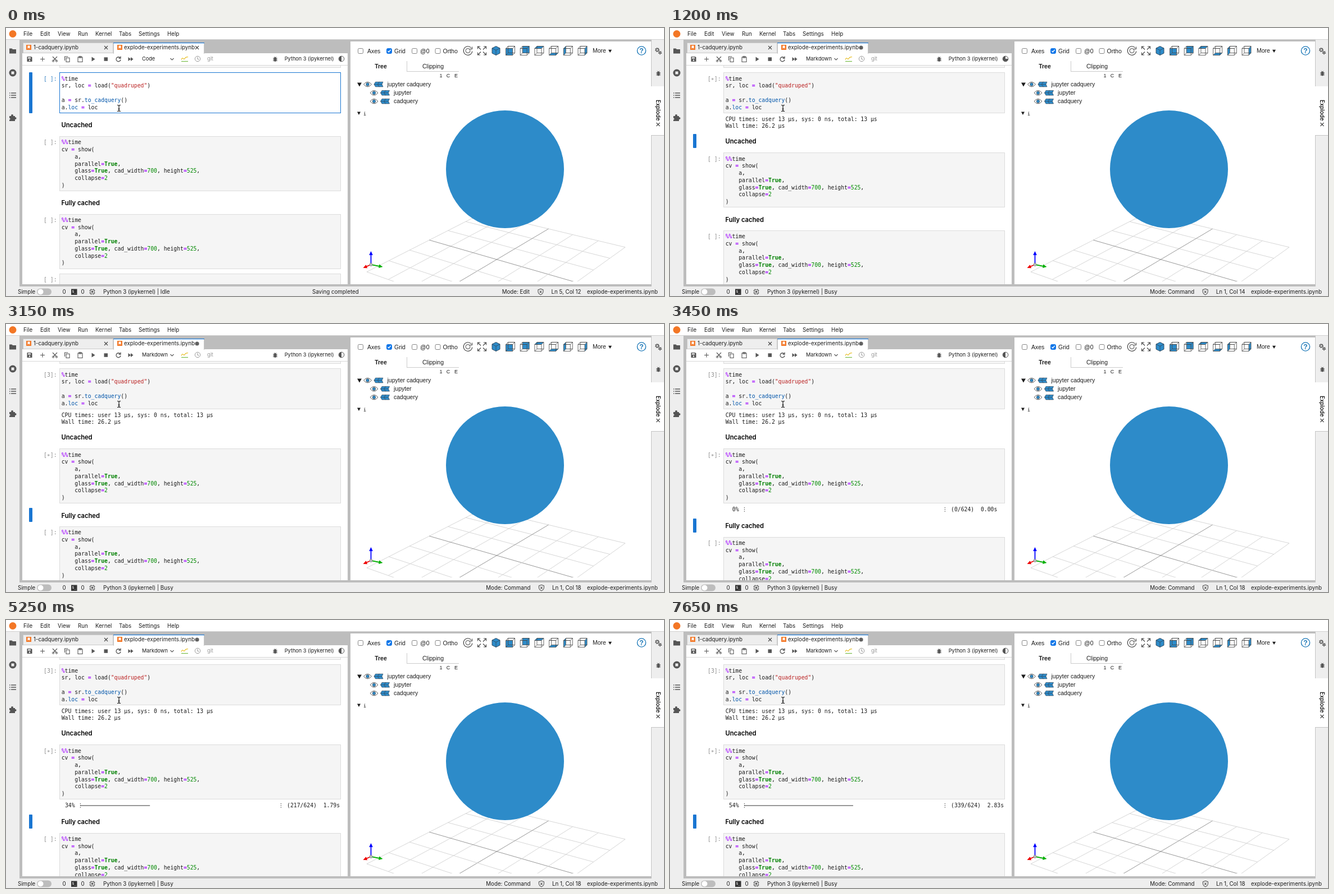
An HTML page with a canvas that plays this animation: 1171x478 px, repeating every 8 s.

```html
<!DOCTYPE html>
<html lang="en">
<head>
<meta charset="utf-8">
<title>Notebook run</title>
<style>
  html, body { margin: 0; width: 100%; height: 100%; overflow: hidden; background: #fff; }
  canvas { display: block; }
</style>
</head>
<body>
<canvas id="stage" width="1171" height="478"></canvas>
<script>
const ctx = document.getElementById('stage').getContext('2d');
const LOOP = 8000;
const UI = 'Inter, sans-serif', SANS = '"Liberation Sans", Arial, sans-serif';
const MONO = '"DejaVu Sans Mono", monospace';
const BLUE = '#1976d2', CAD = '#2d8bc9', ICON = '#555', INK = '#1c1c1c', ORANGE = '#f37726';
const GAP = '#bdbdbd';
const LINE = 12.75;

const LOAD = ['%time', 'sr, loc = load("quadruped")', '', 'a = sr.to_cadquery()', 'a.loc = loc'];
const SHOW = ['%%time', 'cv = show(', '    a,', '    parallel=True,',
  '    glass=True, cad_width=700, height=525,', '    collapse=2', ')'];

// time in ms, parts done, seconds shown
const PROGRESS = [[3450, 0, 0], [3900, 21, .41], [4200, 54, .69], [4350, 76, .89], [4500, 108, 1.05],
  [4800, 152, 1.32], [4950, 188, 1.51], [5250, 217, 1.79], [5550, 236, 2.06], [5700, 258, 2.23],
  [5850, 276, 2.39], [6150, 304, 2.63], [6300, 339, 2.83]];

function rect(x, y, w, h, fill) {
  ctx.fillStyle = fill;
  ctx.fillRect(x, y, w, h);
}

function frame(x, y, w, h, fill, stroke) {
  rect(x, y, w, h, fill);
  ctx.strokeStyle = stroke;
  ctx.lineWidth = 1;
  ctx.strokeRect(x, y, w, h);
}

function disc(x, y, r, fill, stroke, width = 1) {
  ctx.beginPath();
  ctx.arc(x, y, r, 0, 7);
  if (fill) { ctx.fillStyle = fill; ctx.fill(); }
  if (stroke) { ctx.strokeStyle = stroke; ctx.lineWidth = width; ctx.stroke(); }
}

// y is the optical middle of the line
function text(str, x, y, { size = 9.75, font = UI, color = INK, weight = 400, align = 'left' } = {}) {
  ctx.font = `${weight} ${size}px ${font}`;
  ctx.fillStyle = color;
  ctx.textAlign = align;
  ctx.fillText(str, x, y + size * .355);
  return ctx.measureText(str).width;
}

const mono = (str, x, y, opts) => text(str, x, y, { font: MONO, ...opts });
const sans = (str, x, y, opts) => text(str, x, y, { font: SANS, size: 10.5, ...opts });

function icon(x, y, d, stroke = ICON, fill = null, width = 1.1) {
  const path = new Path2D(d);
  ctx.save();
  ctx.translate(x, y);
  if (fill) { ctx.fillStyle = fill; ctx.fill(path); }
  if (stroke) { ctx.strokeStyle = stroke; ctx.lineWidth = width; ctx.stroke(path); }
  ctx.restore();
}

const cross = (x, y) => icon(x, y, 'M-3 -3L3 3M3 -3L-3 3', '#444');

function bug(x, y) {
  icon(x, y, 'M-4 -1.5H4M-4 .7H4M-4 3H4M-2 -4.5L0 -2.5L2 -4.5', ICON, null, .8);
  icon(x, y, 'M-2.4 -1A2.4 2.6 0 0 1 2.4 -1V2A2.4 2.4 0 0 1 -2.4 2Z', null, ICON);
}

function gear(x, y, r) {
  ctx.setLineDash([1.5, 1.2]);
  disc(x, y, r, null, ICON, 1.6);
  ctx.setLineDash([]);
  disc(x, y, r - 1, null, ICON, 1.2);
}

function codeLine(line, x, y) {
  for (const part of line.split(/("[^"]*"|\bTrue\b|\b\d+\b|[%=]+|(?<=\.)\w+)/)) {
    const style = /^"/.test(part) ? { color: '#ba2121' }
      : part === 'True' ? { color: '#008000', weight: 700 }
      : /^\d/.test(part) ? { color: '#080' }
      : /^[%=]/.test(part) ? { color: '#a2f', weight: 700 }
      : /^(to_cadquery|loc)$/.test(part) ? { color: '#05a' } : {};
    x += mono(part, x, y, style);
  }
}

function codeCell(top, lines, prompt, { active, editing } = {}) {
  const height = lines.length * LINE + 9;
  frame(95.5, Math.round(top) + .5, 500, Math.round(height) - 1,
    editing ? '#fff' : '#f5f5f5', editing ? BLUE : '#dcdcdc');
  mono(prompt, 90.5, top + 10.9, { align: 'right', color: active ? '#307fc1' : '#8b8b8b' });
  lines.forEach((line, i) => codeLine(line, 98.7, top + 10.9 + i * LINE));
  if (active) marker(top, height);
}

function marker(top, height) {
  ctx.fillStyle = BLUE;
  ctx.beginPath();
  ctx.roundRect(41, Math.floor(top), 6, Math.round(height), 1);
  ctx.fill();
}

function heading(str, y, active) {
  text(str, 98.5, y, { size: 11.2, weight: 600, color: '#000' });
  if (active) marker(y - 13, 25);
}

function progressBar(t, y) {
  const [, done, seconds] = PROGRESS.filter(p => p[0] <= t).pop();
  mono(Math.floor(done / 6.24) + '%', 122.5, y, { align: 'right' });
  mono('⋮', 127.5, y);
  rect(132, y - .5, 357 * done / 624, 1, '#333');
  mono(`⋮ (${done}/624)  ${seconds.toFixed(2)}s`, 484.5, y);
}

function notebook(t) {
  const ran = t >= 750, finished = t >= 2550, shown = t >= 3150;
  ctx.save();
  ctx.beginPath();
  ctx.rect(29, 67, 579, 390);
  ctx.clip();
  frame(95.5, 50.5, 500, 20, '#f5f5f5', '#dcdcdc');
  codeCell(79.2, LOAD, finished ? '[3]:' : ran ? '[∗]:' : '[ ]:', { active: !ran, editing: !ran });
  if (t >= 600 && !ran) rect(163, 135, 1, 12, '#000');

  let shift = 0;
  if (t >= 1200) {
    mono('CPU times: user 13 µs, sys: 0 ns, total: 13 µs', 98.7, 162.3);
    mono('Wall time: 26.2 µs', 98.7, 175);
    shift = 29.25;
  }
  heading('Uncached', 173 + shift, ran && t < 2250);
  codeCell(193 + shift, SHOW, shown ? '[∗]:' : '[ ]:', { active: t >= 2250 && !shown });
  if (t >= 3450) {
    progressBar(t, 331);
    shift += 18.75;
  }
  heading('Fully cached', 312.4 + shift, shown);
  codeCell(331.6 + shift, SHOW, '[ ]:');
  codeCell(437.6 + shift, ['', ''], '[ ]:');
  icon(201, 143, 'M-3 -5.5Q0 -5.5 0 -4Q0 -5.5 3 -5.5M0 -4V4M-3 5.5Q0 5.5 0 4Q0 5.5 3 5.5M-1.5 1.5H1.5', '#000');
  ctx.restore();
}

function tabs(t) {
  rect(29, 45, 579, 412, '#fff');
  frame(30.5, 26.5, 160, 18, '#eee', '#c8c8c8');
  frame(191.5, 26.5, 161, 19, '#fff', '#c8c8c8');
  rect(192, 44, 160, 2, '#fff');
  rect(191, 26, 162, 1.2, BLUE);
  for (const x of [36, 198]) {
    rect(x, 30, 9, 9, ORANGE);
    icon(x + 4.5, 34.5, 'M-2 -3H2V2.5L0 .7L-2 2.5Z', null, '#fff');
  }
  text('1-cadquery.ipynb', 49, 35);
  text('explode-experiments.ipynb', 210, 35);
  cross(178, 35);
  if (t < 750) cross(340, 35); else disc(340, 35, 3.6, '#616161');
}

function toolbar(t) {
  rect(29, 66, 579, 1, '#d8d8d8');
  const y = 55.5, small = { size: 9.2 };
  icon(42, y, 'M-4.5 -4.5H3L4.5 -3V4.5H-4.5Z', null, ICON);
  rect(39, 52.3, 5, 2.2, '#fff');
  disc(42, 57.5, 1.3, '#fff');
  icon(65, y, 'M-4 0H4M0 -4V4');
  icon(87, y, 'M-4 -4.5L3 3M4 -4.5L-3 3');
  disc(84, 58.7, 1.6, null, ICON);
  disc(90, 58.7, 1.6, null, ICON);
  icon(109, y, 'M-4.5 2.5V-4.5H1.5M-2 -2.3H4V5H-2Z');
  icon(132, y, 'M-4 -3.5H4V5H-4ZM-2 -3.5V-5H2V-2.5H-2Z');
  icon(155, y, 'M-2.5 -4L3.5 0L-2.5 4Z', null, ICON);
  rect(174.5, 52.3, 6.5, 6.5, ICON);
  icon(200, y, 'M3 -2.5A4 4 0 1 0 4 1M4 -5V-1.5H.5', ICON, null, 1.3);
  icon(222, y, 'M-4.5 -3.5L0 0L-4.5 3.5ZM0 -3.5L4.5 0L0 3.5Z', null, ICON);
  const isCode = t < 750 || t >= 2250 && t < 3150;
  text(isCode ? 'Code' : 'Markdown', 242, 55, small);
  icon(295.5, y, 'M-3 -1.5L0 1.5L3 -1.5');
  icon(318, y, 'M-6 1C-3 -6 -2 3 0 -1S3 -3 6 -4', '#e5b916');
  icon(318, y, 'M-6 4H6', '#70b83c');
  disc(341, 55, 4.7, null, '#999');
  icon(341, 55, 'M0 -3V0L2 1.5', '#999');
  text('git', 358, 55, { ...small, color: '#999' });
  bug(479, 55.5);
  text('Python 3 (ipykernel)', 583.5, 55, { ...small, align: 'right' });
  const busy = t >= 750 && t < 2550;
  disc(597, 55, 4.8, '#fff', ICON);
  icon(597, 55, busy ? 'M0 0V-4.8A4.8 4.8 0 1 0 4.8 0Z' : 'M0 -4.8A4.8 4.8 0 0 0 0 4.8Z', null, ICON);
}

function sidebars() {
  rect(0, 21, 24, 440, '#eee');
  icon(12, 41, 'M-6 -4.5H-1.5L0 -3H6V4.5H-6Z', null, ICON);
  disc(12, 80, 6.5, ICON);
  rect(9.5, 77.5, 5, 5, '#eee');
  icon(12, 120, 'M-6 -4H-4.5M-3 -4H6M-6 0H-4.5M-3 0H6M-6 4H-4.5M-3 4H6', ICON, null, 1.4);
  icon(11, 161, 'M-5 -4H5V5H-5Z', null, ICON);
  disc(11, 156, 2, ICON);
  disc(16.5, 161, 2, ICON);
  disc(6, 162, 1.6, '#eee');

  rect(1148, 21, 23, 440, '#eee');
  rect(1148, 104, 23, 87, '#fff');
  rect(1148, 191, 23, 1, '#c4c4c4');
  rect(1148, 21, 1, 83, '#c4c4c4');
  rect(1148, 191, 1, 270, '#c4c4c4');
  gear(1159, 39, 3.2);
  gear(1164, 44, 2.4);
  bug(1161, 81);
  ctx.save();
  ctx.translate(1160, 128);
  ctx.rotate(Math.PI / 2);
  text('Explode', 0, 0, { weight: 500, color: '#000' });
  ctx.restore();
  cross(1160.5, 172);
}

function cube(x, face) {
  const faces = ['M-8 -4H4V8H-8Z', 'M-4 -8H8V4H-4Z', 'M-8 -4L-4 -8H8L4 -4Z', 'M-8 8L-4 4H8L4 8Z',
    'M-8 -4L-4 -8V4L-8 8Z', 'M4 -4L8 -8V4L4 8Z'];
  icon(x, 40.5, faces[face], null, CAD);
  faces.slice(0, 3).forEach(d => icon(x, 40.5, d, '#444', null, .8));
  icon(x, 40.5, 'M4 8L8 4M-8 8L-4 4', '#444', null, .8);
}

function treeRow(x, y, label) {
  icon(x, y, 'M-7 0Q0 -8.5 7 0Q0 8.5 -7 0Z', '#444', '#fff', .9);
  disc(x, y, 2.7, CAD, '#345', .8);
  for (const dx of [16, 22.5])
    icon(x + dx, y, 'M-4.5 0L-2 -4.3H5L3 0L5 4.3H-2ZM-4.5 0H3', '#345', CAD, .7);
  sans(label, x + 35, y);
}

function viewerControls() {
  [['Axes', 631, 643], ['Grid', 682, 691], ['@0', 727, 737], ['Ortho', 768.5, 777.5]].forEach(([label, x, tx]) => {
    const on = label === 'Grid';
    ctx.beginPath();
    ctx.roundRect(x - 4.5, 36.5, 9, 9, 2);
    ctx.fillStyle = on ? '#0b74e8' : '#fff';
    ctx.fill();
    ctx.strokeStyle = on ? '#0b74e8' : '#777';
    ctx.lineWidth = .9;
    ctx.stroke();
    if (on) icon(x, 41, 'M-2.5 0L-.7 2L2.6 -2.3', '#fff', null, 1.4);
    sans(label, tx, 41);
  });
  icon(822, 40.5, 'M6 -5A7.8 7.8 0 1 0 7.8 1M7.5 -7V-3H3.5', '#444');
  disc(822, 40.5, 4, null, '#444');
  icon(847, 40.5, 'M-7.5 -3V-7.5H-3M3 -7.5H7.5V-3M7.5 3V7.5H3M-3 7.5H-7.5V3M-7 -7L-2 -2M7 -7L2 -2M7 7L2 2M-7 7L-2 2', '#444');
  icon(872, 40.5, 'M0 -8L7 -4.5V4.5L0 8L-7 4.5V-4.5Z', '#345', CAD, .9);
  icon(872, 40.5, 'M-7 -4.5L0 -1L7 -4.5M0 -1V8', '#345', null, .8);
  for (let i = 0; i < 6; i++) cube(897.5 + i * 25.7, i);
  sans('More', 1044, 40.5);
  icon(1075, 41, 'M-3 -2.3H3L0 3Z', null, INK);
  disc(1131, 40.5, 7.6, '#fff', '#1c78b8', 1.4);
  sans('?', 1131, 40.5, { align: 'center', size: 12, weight: 700, color: '#1c78b8' });

  sans('Tree', 667, 68, { weight: 700, align: 'center' });
  sans('Clipping', 760, 68, { align: 'center' });
  rect(713, 59, 1, 18, '#ccc');
  rect(713, 77, 93, 1, '#ccc');
  [['1', 774], ['C', 787], ['E', 801]].forEach(([s, x]) => sans(s, x, 85, { size: 9, align: 'center' }));
  icon(629, 101, 'M-4 -3.5H4L0 3.5Z', null, INK);
  treeRow(643.5, 100.5, 'jupyter cadquery');
  treeRow(655, 115.7, 'jupyter');
  treeRow(655, 130.7, 'cadquery');
  icon(628, 152, 'M-3 -2.5H3L0 3Z', null, INK);
  mono('i', 636, 152.5, { size: 8.5 });
}

// Ground plane as a perspective square: u runs right, v runs towards the left
function ground(u, v) {
  const wr = .86, wl = .85;
  const w = 1 + u * (wr - 1) + v * (wl - 1);
  return [
    (848 + u * (1102 * wr - 848) + v * (642 * wl - 848)) / w,
    (330 + u * (391 * wr - 330) + v * (435 * wl - 330)) / w
  ];
}

function arrow(dx, dy, color) {
  const len = Math.hypot(dx, dy);
  ctx.save();
  ctx.translate(649.5, 422);
  ctx.rotate(Math.atan2(dy, dx));
  rect(0, -.9, len - 5, 1.8, color);
  ctx.translate(len, 0);
  icon(0, 0, 'M0 0L-7 -3.3V3.3Z', null, color);
  ctx.restore();
}

function viewer() {
  rect(613, 24, 535, 433, '#fff');
  viewerControls();
  ctx.save();
  ctx.beginPath();
  ctx.rect(613, 300, 535, 152);
  ctx.clip();
  for (let i = 0; i <= 6; i++) {
    const k = i / 6;
    ctx.strokeStyle = i === 3 ? '#8c8c8c' : '#d2d2d2';
    ctx.lineWidth = .9;
    ctx.beginPath();
    ctx.moveTo(...ground(k, 0));
    ctx.lineTo(...ground(k, 1));
    ctx.moveTo(...ground(0, k));
    ctx.lineTo(...ground(1, k));
    ctx.stroke();
  }
  ctx.restore();
  disc(888, 252, 105, CAD);
  arrow(0, -24, '#00f');
  arrow(21, 4, '#00b000');
  arrow(-14, 6, '#e00');
  disc(649.5, 422, 2.6, '#bbb', '#777', .7);
}

function menuBar() {
  rect(0, 0, 1171, 21, '#fff');
  disc(12, 10.5, 6.5, ORANGE);
  [['File', 31], ['Edit', 61], ['View', 92], ['Run', 128], ['Kernel', 159], ['Tabs', 201], ['Settings', 236],
    ['Help', 287]].forEach(([label, x]) => text(label, x, 11));
  rect(0, 20, 1171, 1, '#d0d0d0');
}

function statusBar(t) {
  rect(0, 461, 1171, 17, '#eee');
  const y = 470.5;
  text('Simple', 21, y);
  ctx.fillStyle = GAP;
  ctx.beginPath();
  ctx.roundRect(55, 464.5, 26, 12, 6);
  ctx.fill();
  disc(61.5, y, 5, '#fff');
  text('0', 100.5, y);
  rect(116, 465.5, 10.5, 10.5, '#333');
  mono('$_', 117.2, 470, { size: 6.5, color: '#fff' });
  text('0', 133.5, y);
  icon(153.5, y, 'M-5 -2H5M-5 2H5M-2 -5V5M2 -5V5');
  frame(150, 467, 7, 7, '#eee', ICON);
  rect(152, 469, 3, 3, ICON);
  const busy = t >= 750 && t < 2550 || t >= 3150;
  text('Python 3 (ipykernel) | ' + (busy ? 'Busy' : 'Idle'), 173, y);
  if (t < 600) text('Saving completed', 545, y);

  text('explode-experiments.ipynb', 1160, y, { align: 'right' });
  const cursor = t < 750 ? 'Ln 5, Col 12' : t < 2250 ? 'Ln 1, Col 14' : t < 3150 ? 'Ln 1, Col 1' : 'Ln 1, Col 18';
  const left = 1023.5 - text(cursor, 1023.5, y, { align: 'right' });
  icon(left - 19, y, 'M0 -5.2L4.5 -3.5V0Q4 3.7 0 5.3Q-4 3.7 -4.5 0V-3.5ZM-1.8 -2L1.8 2M1.8 -2L-1.8 2');
  text('Mode: ' + (t < 750 ? 'Edit' : 'Command'), left - 38.5, y, { align: 'right' });
}

function draw(now) {
  const t = now % LOOP;
  rect(0, 0, 1171, 478, GAP);
  menuBar();
  sidebars();
  tabs(t);
  toolbar(t);
  notebook(t);
  viewer();
  statusBar(t);
  requestAnimationFrame(draw);
}
requestAnimationFrame(draw);
</script>
</body>
</html>
```
